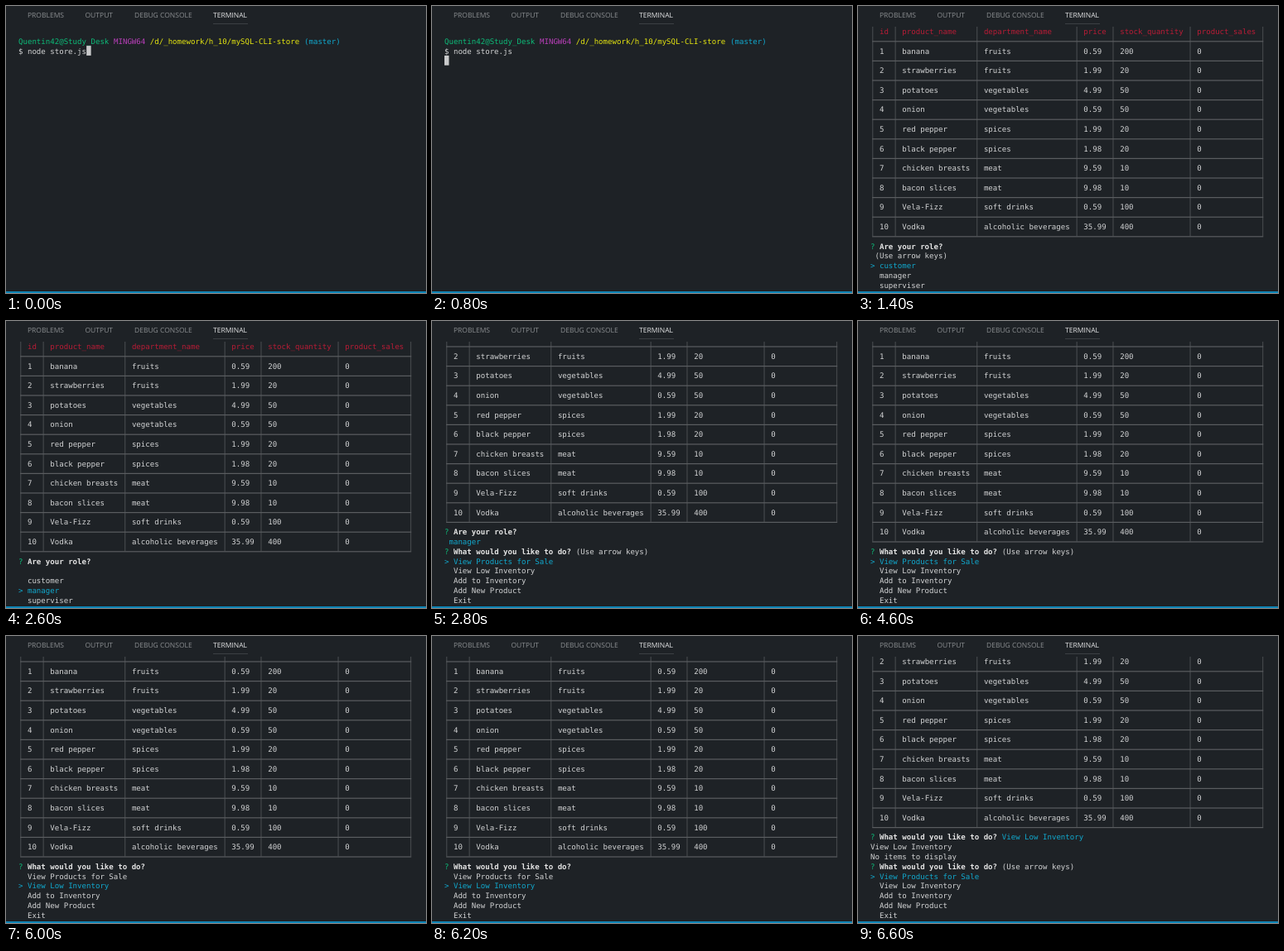
An HTML page for the animation above (8000 ms loop, 507 by 347 pixels).

```html
<!DOCTYPE html>
<html lang="en">
<head>
<meta charset="utf-8">
<title>Terminal store</title>
<style>
  html, body { margin: 0; width: 100%; height: 100%; overflow: hidden; background: #1e2226; }
  svg { display: block; width: 507px; height: 347px; text-rendering: geometricPrecision; }
  #tabs { font: 8.5px "Open Sans", "Noto Sans", sans-serif; fill: #8b8e91; }
  #screen { font-family: "DejaVu Sans Mono", monospace; }
</style>
</head>
<body>
<svg viewBox="0 0 507 347">
  <rect width="507" height="347" fill="#1e2226"/>
  <g id="tabs">
    <text x="26" y="14.4">PROBLEMS</text>
    <text x="95.5" y="14.4">OUTPUT</text>
    <text x="155" y="14.4">DEBUG CONSOLE</text>
    <text x="250" y="14.4" fill="#e4e5e6">TERMINAL</text>
  </g>
  <rect x="250" y="21" width="42" height="1" fill="#3c4044"/>
  <g id="screen"></g>
  <rect y="345" width="507" height="2" fill="#0e86b8"/>
</svg>
<script>
const LOOP = 8000, LEFT = 15, CELL = 5.476, LINE = 11.8;
const WHITE = '#d2d3d4', BRIGHT = '#e4e4e4', GREEN = '#0dbc79', CYAN = '#11a8cd',
      RED = '#b81c36', PURPLE = '#bc3fbc', YELLOW = '#e5e510';

const screen = document.getElementById('screen');
const colX = col => LEFT + col * CELL;
const rowY = row => 30.5 + row * LINE;

// Pick the font size whose advance fills one cell
const pen = document.createElement('canvas').getContext('2d');
pen.font = '100px ' + getComputedStyle(screen).fontFamily;
screen.style.fontSize = 100 * CELL / pen.measureText('m').width + 'px';

const text = (row, col, str, fill = WHITE, weight = 400) =>
  `<text x="${colX(col)}" y="${rowY(row) + 3.5}" fill="${fill}" font-weight="${weight}">${str}</text>`;
const rect = (x, y, w, h, fill) =>
  `<rect x="${x}" y="${y}" width="${w}" height="${h}" fill="${fill}"/>`;
const cursor = (row, col) => rect(colX(col), rowY(row) - 6, CELL, LINE, '#c9cacb');

const edges = [0, 5, 23, 45, 53, 70, 86];
const header = ['id', 'product_name', 'department_name', 'price', 'stock_quantity', 'product_sales'];
const items = [
  ['banana', 'fruits', '0.59', 200],
  ['strawberries', 'fruits', '1.99', 20],
  ['potatoes', 'vegetables', '4.99', 50],
  ['onion', 'vegetables', '0.59', 50],
  ['red pepper', 'spices', '1.99', 20],
  ['black pepper', 'spices', '1.98', 20],
  ['chicken breasts', 'meat', '9.59', 10],
  ['bacon slices', 'meat', '9.98', 10],
  ['Vela-Fizz', 'soft drinks', '0.59', 100],
  ['Vodka', 'alcoholic beverages', '35.99', 400]
].map((item, i) => [i + 1, ...item, 0]);

// Table whose bottom border lies on the given row; rows above the view are cut
function table(bottom) {
  const top = 25, thick = 1.2;
  const edgeX = col => colX(col + .5) - thick / 2;
  let out = '';
  for (const col of edges)
    out += rect(edgeX(col), top, thick, rowY(bottom) - top, '#44484b');
  for (let row = bottom; row >= 0; row -= 2)
    out += rect(edgeX(0), rowY(row) - .1, edgeX(86) - edgeX(0) + thick, thick, '#5a5d60');
  [header, ...items].forEach((cells, i) => {
    const row = bottom - 21 + 2 * i;
    if (row < 0) return;
    cells.forEach((cell, c) => out += text(row, edges[c] + 2, cell, i ? WHITE : RED));
  });
  return out;
}

const ask = (row, question) => text(row, 0, '?', GREEN) + text(row, 2, question, BRIGHT, 700);

const choices = (row, list, picked) => list.map((label, i) => i === picked
  ? text(row + i, 0, '&gt;', CYAN) + text(row + i, 2, label, CYAN)
  : text(row + i, 2, label)).join('');

const hint = '(Use arrow keys)';
const todo = 'What would you like to do?';
const roles = ['customer', 'manager', 'superviser'];
const actions = ['View Products for Sale', 'View Low Inventory', 'Add to Inventory', 'Add New Product', 'Exit'];

const shell = () =>
  text(1, 0, 'Quentin42@Study_Desk', GREEN) + text(1, 21, 'MINGW64', PURPLE) +
  text(1, 29, '/d/_homework/h_10/mySQL-CLI-store', YELLOW) + text(1, 63, '(master)', CYAN) +
  text(2, 0, '$ node store.js');

const roleMenu = picked => table(21) + ask(22, 'Are your role?') +
  (picked ? '' : text(23, 1, hint)) + choices(24, roles, picked);

const actionMenu = picked => ask(21, todo) +
  (picked ? '' : text(21, 29, hint)) + choices(22, actions, picked);

const scenes = [
  [0, () => shell() + cursor(2, 15)],
  [600, () => shell() + cursor(3, 0)],
  [1400, () => roleMenu(0)],
  [2400, () => roleMenu(1)],
  [2800, () => table(18) + ask(19, 'Are your role?') + text(20, 1, 'manager', CYAN) + actionMenu(0)],
  [4000, () => table(20) + actionMenu(0)],
  [6000, () => table(20) + actionMenu(1)],
  [6600, () => table(17) + ask(18, todo) + text(18, 29, actions[1], CYAN) +
    text(19, 0, actions[1]) + text(20, 0, 'No items to display') + actionMenu(0)]
];

let shown;
function draw() {
  const t = performance.now() % LOOP;
  const scene = scenes.filter(([start]) => start <= t).pop();
  if (scene !== shown) {
    shown = scene;
    screen.innerHTML = scene[1]();
  }
  requestAnimationFrame(draw);
}
draw();
</script>
</body>
</html>
```
